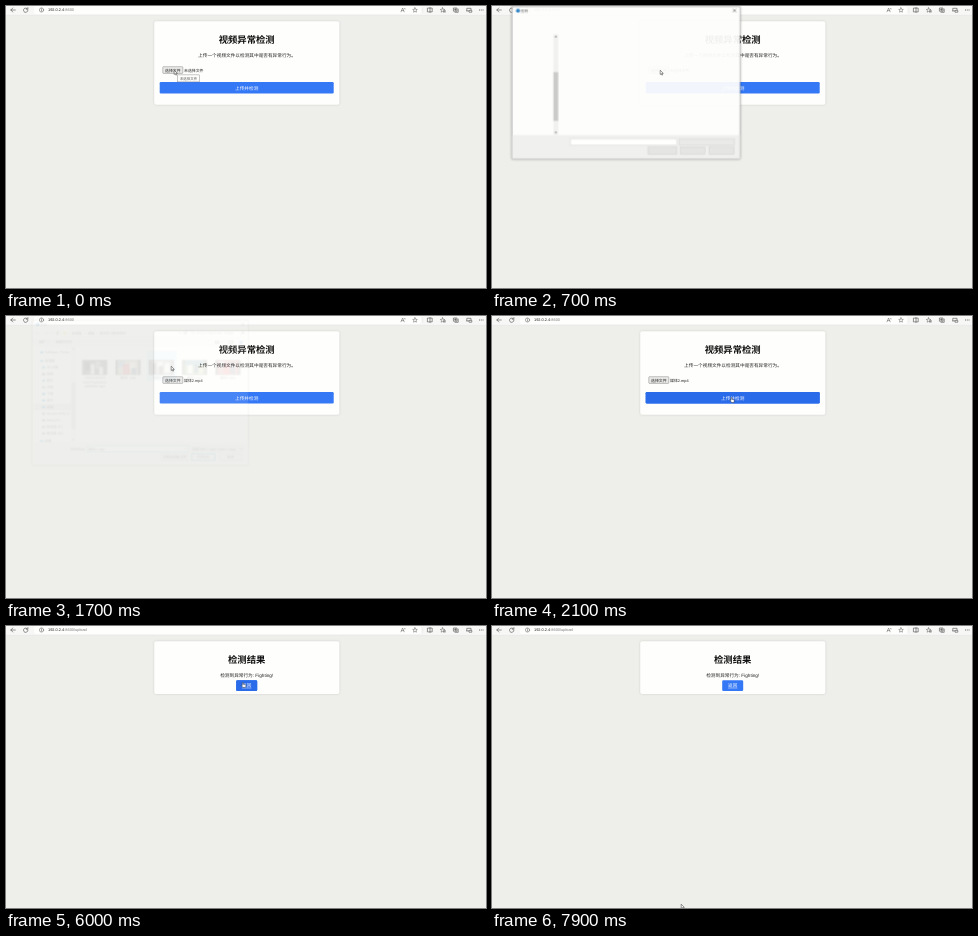
Animation of 480x282 px, one loop 8 s. Source, as an HTML page:

```html
<!DOCTYPE html>
<html lang="zh-CN">
<head>
<meta charset="utf-8">
<title>视频异常检测</title>
<style>
html, body { margin: 0; width: 100%; height: 100%; overflow: hidden; background: #eeefeb; }
svg { display: block; width: 100%; height: 100%; }
text { font-family: "Liberation Sans", "Noto Sans CJK SC", "Noto Sans CJK", sans-serif; text-rendering: geometricPrecision; fill: #222; white-space: pre; }
.mid { text-anchor: middle; }
.h1 { font-size: 9.33px; font-weight: 700; fill: #111; }
.p { font-size: 4.67px; font-weight: 500; }
.s { font-size: 3.9px; }
.d text { font-size: 3.5px; }
.dim, .d .dim { fill: #777; }
.white { fill: #fff; }
.ico { fill: none; stroke: #4a4a4a; stroke-width: .6; stroke-linecap: round; stroke-linejoin: round; }
.card { fill: #fefefc; filter: drop-shadow(0 0 1.2px rgba(0,0,0,.13)); }
.btn { fill: #3478f6; }
.dark { fill: #2a6bea; }

.anim { animation: 8s step-end infinite both; }
.smooth { animation-timing-function: linear; }
.tip { animation-name: tip; }
.upload { animation-name: upload; }
.result { animation-name: result; }
.wait { animation-name: wait; }
.idle { animation-name: idle; }
.empty { animation-name: empty; }
.picked { animation-name: picked; }
.over { animation-name: over; }
.over2 { animation-name: over2; }
.dlg { animation-name: dlg; transform-origin: 134px 76px; }
.labels { animation-name: labels; }
.files { animation-name: files; }
.pick { animation-name: pick; }
.typed { animation-name: typed; }
.cursor { animation-name: cursor; }
.arrow { animation-name: arrow; }
.hand { animation-name: hand; }

@keyframes tip { 0%, 1.25% { opacity: 1 } 5%, 100% { opacity: 0 } }
@keyframes upload { 0% { opacity: 1 } 75%, 100% { opacity: 0 } }
@keyframes result { 0% { opacity: 0 } 75%, 100% { opacity: 1 } }
@keyframes wait { 0% { opacity: 0 } 28.75% { opacity: 1 } 75%, 100% { opacity: 0 } }
@keyframes idle { 0% { opacity: 1 } 28.75% { opacity: 0 } 75%, 100% { opacity: 1 } }
@keyframes empty { 0% { opacity: 1 } 20%, 100% { opacity: 0 } }
@keyframes picked { 0% { opacity: 0 } 20%, 100% { opacity: 1 } }
@keyframes over { 0%, 25% { opacity: 0 } 26.25%, 32.5% { opacity: 1 } 36.25%, 100% { opacity: 0 } }
@keyframes over2 { 0%, 74.9% { opacity: 0 } 75%, 88.75% { opacity: 1 } 91.25%, 100% { opacity: 0 } }
@keyframes dlg {
  0% { opacity: 0; transform: scale(.978, .968) }
  7.5% { opacity: .6; transform: scale(.978, .968) }
  8.75% { opacity: .95; transform: scale(.995) }
  10% { opacity: 1; transform: scale(1) }
  20% { opacity: .55; transform: scale(.97) }
  21.25% { opacity: .1; transform: scale(.943) }
  22.5%, 100% { opacity: 0; transform: scale(.94) }
}
@keyframes labels { 0% { opacity: 0 } 10%, 100% { opacity: 1 } }
@keyframes files { 0% { opacity: 0 } 11.25%, 100% { opacity: 1 } }
@keyframes pick { 0% { opacity: 0 } 16.25% { opacity: .5 } 18.75%, 100% { opacity: 1 } }
@keyframes typed { 0% { opacity: 0 } 18.75%, 100% { opacity: 1 } }
@keyframes cursor {
  0%, 10% { transform: translate(168px, 64px) }
  13.75%, 21.25% { transform: translate(165px, 50px); animation-timing-function: ease-in-out }
  26.25%, 31.25% { transform: translate(238px, 81px); animation-timing-function: ease-in-out }
  36.25%, 87.5% { transform: translate(235.5px, 56px); animation-timing-function: ease-in-out }
  98.75%, 100% { transform: translate(189px, 278px) }
}
@keyframes arrow { 0% { opacity: 1 } 26.25% { opacity: 0 } 33.75% { opacity: 1 } 75% { opacity: 0 } 90%, 100% { opacity: 1 } }
@keyframes hand { 0% { opacity: 0 } 26.25% { opacity: 1 } 33.75% { opacity: 0 } 75% { opacity: 1 } 90%, 100% { opacity: 0 } }
</style>
</head>
<body>
<svg viewBox="0 0 480 282" preserveAspectRatio="none">
  <rect width="480" height="282" fill="#eeefeb"/>

  <!-- browser bar -->
  <rect width="480" height="9" fill="#f7f8f6"/>
  <rect x="28" y=".3" width="387" height="7.6" rx="2" fill="#fefefd"/>
  <path d="M0 9.2H480" stroke="#e4e5e2" stroke-width=".5"/>
  <g class="ico">
    <path d="M9.3 4H4.8M6.8 2L4.8 4L6.8 6"/>
    <path class="anim idle" d="M21.6 3.1A2.2 2.2 0 1 0 21.9 4.4M21.9 1.6V3.2H20.3"/>
    <path class="anim wait" d="M18 2.2L21.6 5.8M21.6 2.2L18 5.8"/>
    <circle cx="35.5" cy="4" r="2.1" stroke-width=".45"/>
    <path d="M35.5 3.8V5.1M35.5 2.8V2.9" stroke-width=".5"/>
    <path d="M395 5.8L396.6 2L398.2 5.8M395.6 4.6H397.6M398.6 2.4Q399.4 1.8 399.2 3" stroke-width=".45"/>
    <path id="star" d="M409 1.8L409.7 3.3L411.3 3.5L410.1 4.6L410.4 6.2L409 5.4L407.6 6.2L407.9 4.6L406.7 3.5L408.3 3.3Z" stroke-width=".45"/>
    <path d="M421.8 2.1H426.2V5.9H421.8ZM424 1.6V6.4"/>
    <use href="#star" x="27.6"/>
    <path d="M437.8 4.8H439.4M438 5.9H439.4"/>
    <path d="M447.8 2H451V5.2H447.8ZM449 6.3H452.2V3.1M449.4 2.8V4.4M448.6 3.6H450.2"/>
    <path d="M460.8 4.9V2.3H465V3.6M460.8 4.9H462.6M463.4 4.4H465.8V6.2H463.4Z"/>
    <path d="M473.4 4H473.5M475.2 4H475.3M477 4H477.1" stroke-width=".9"/>
  </g>
  <path d="M416.8 1.5V6.8" stroke="#ddd" stroke-width=".4"/>
  <text class="s" x="42" y="5.4">192.0.2.4<tspan class="dim">:8600</tspan><tspan class="dim anim result">/upload</tspan></text>

  <!-- upload page -->
  <g class="anim upload">
    <rect class="card anim idle" x="148.2" y="15.2" width="185.2" height="83.6" rx="2"/>
    <rect class="card anim wait" x="148.2" y="15.2" width="185.2" height="90.8" rx="2"/>
    <text class="h1 mid" x="240.7" y="37.4">视频异常检测</text>
    <text class="p mid" x="241" y="50.6">上传一个视频文件以检测其中是否有异常行为。</text>
    <rect x="156.8" y="60.7" width="20" height="6.7" rx=".7" fill="#e9e9e8" stroke="#777" stroke-width=".45"/>
    <text class="s mid" x="166.8" y="65.5">选择文件</text>
    <text class="s anim empty" x="178" y="65.5">未选择文件</text>
    <text class="s anim picked" x="178" y="65.5">媒体2.mp4</text>
    <rect class="btn" x="153.7" y="76" width="174" height="11.6" rx="1.3"/>
    <rect class="dark anim smooth over" x="153.7" y="76" width="174" height="11.6" rx="1.3"/>
    <text class="p mid white" x="240.7" y="83.6">上传并检测</text>
    <text class="p mid anim wait" x="240.7" y="98.9">正在检测，请稍候...</text>
  </g>

  <!-- result page -->
  <g class="anim result">
    <rect class="card" x="148.2" y="15.2" width="185.2" height="52.8" rx="2"/>
    <text class="h1 mid" x="240.7" y="37.4">检测结果</text>
    <text class="p mid" x="240.7" y="50.6">检测到异常行为: Fighting!</text>
    <rect class="btn" x="230.2" y="54.2" width="21" height="10.9" rx="1.3"/>
    <rect class="dark anim smooth over2" x="230.2" y="54.2" width="21" height="10.9" rx="1.3"/>
    <text class="p mid white" x="240.7" y="61.3">返回</text>
    <path d="M236 62.1H245.4" stroke="#fff" stroke-width=".4"/>
  </g>

  <!-- file dialog -->
  <g class="d anim dlg">
    <rect x="19.5" y=".2" width="229" height="152.8" fill="#fdfdfc" stroke="#a5a5a5" stroke-width=".5" style="filter: drop-shadow(0 .8px 1.6px rgba(0,0,0,.35))"/>
    <rect x="19.7" y="129.5" width="228.6" height="23.3" fill="#f0f0ef"/>
    <circle cx="25.4" cy="4.2" r="2" fill="#2a7fc4"/>
    <text x="28.3" y="5.6">打开</text>
    <path class="ico" d="M241.7 2.8L244.3 5.4M244.3 2.8L241.7 5.4" stroke-width=".4"/>
    <rect x="61" y="28" width="4.8" height="101" fill="#f1f1f0"/>
    <rect x="61" y="66" width="4.8" height="49" fill="#c9c9c9"/>
    <path d="M62.3 31L63.4 29.6L64.5 31ZM62.3 126L63.4 127.4L64.5 126Z" fill="#555"/>
    <g fill="#fff" stroke="#c4c4c4" stroke-width=".35">
      <rect x="78" y="133" width="107" height="6.6"/>
      <rect x="187.5" y="133" width="55.5" height="6.6" fill="#e9e9e8"/>
      <rect x="156" y="141" width="29" height="7.8" fill="#e4e4e3"/>
      <rect x="188.7" y="141.2" width="24.6" height="7.4" fill="#e4e4e3"/>
      <rect x="217.5" y="141" width="25.2" height="7.8" fill="#e4e4e3"/>
    </g>

    <g class="anim labels">
      <g fill="none" stroke="#d5d5d5" stroke-width=".35">
        <rect x="50.5" y="10" width="134.5" height="7.2"/>
        <rect x="187.2" y="10" width="58" height="7.2"/>
      </g>
      <rect x="19.8" y="18.8" width="228.4" height="8.6" fill="#f4f5f5"/>
      <path d="M19.8 27.5H248.2" stroke="#e0e0e0" stroke-width=".4"/>
      <g class="ico" stroke-width=".45">
        <path d="M27 13.6H23.8M25 12.4L23.8 13.6L25 14.8M32.4 13.6H35.6M34.4 12.4L35.6 13.6L34.4 14.8" opacity=".3"/>
        <path d="M39.4 13.2L40.2 14L41 13.2" opacity=".5"/>
        <path d="M46.6 15.4V12M45.3 13.3L46.6 12L47.9 13.3"/>
        <path d="M175.2 13.1L176.3 14.2L177.4 13.1M183 13A1.5 1.5 0 1 0 183.1 14M183.1 11.9V13.1H182"/>
        <path d="M241 15L242.1 13.9"/><circle cx="242.9" cy="13" r="1.1"/>
        <path d="M214 21.8H217.4V24.6H214ZM214 23.2H217.4M220.4 22.8L221.2 23.6L222 22.8"/>
        <path d="M228.8 21.5H232.6V24.7H228.8ZM231.2 21.5V24.7"/>
        <path d="M36 22.8L36.8 23.6L37.6 22.8"/>
      </g>
      <rect x="52.4" y="12" width="3.4" height="3.2" rx=".3" fill="#f2cf66"/>
      <circle cx="241.2" cy="23.1" r="1.9" fill="#1b6fc0"/>
      <text class="white mid" x="241.2" y="24.3" style="font-weight:700">?</text>
      <text x="58" y="14.9">›</text><text x="61.6" y="14.9">此电脑</text>
      <text x="75" y="14.9">›</text><text x="78.6" y="14.9">桌面</text>
      <text x="87.8" y="14.9">›</text><text x="91" y="14.9">校内实习相关材料</text>
      <text class="dim" x="189" y="14.9">在 校内实习相关材料 中搜索</text>
      <text x="26.5" y="24.4">组织</text>
      <text x="44.6" y="24.4">新建文件夹</text>
      <g id="side"></g>
      <text x="59.8" y="137.6">文件名(N):</text>
      <rect x="78" y="133" width="107" height="6.6" fill="#fff" stroke="#3b87cf" stroke-width=".5"/>
      <path d="M79.5 134.2V138.4" stroke="#333" stroke-width=".3"/>
      <text class="anim typed" x="79.8" y="137.6">媒体2.mp4</text>
      <text x="189.2" y="137.6">视频文件 (*.ogm;*.wmv;*.mpg</text>
      <path class="ico" d="M181.2 136L182 136.8L182.8 136M239.8 136L240.6 136.8L241.4 136" stroke-width=".4"/>
      <text class="mid" x="170.5" y="146.2">从移动设备上传</text>
      <rect x="188.8" y="141.3" width="24.4" height="7.2" fill="none" stroke="#2f7fd0" stroke-width=".7"/>
      <text class="mid" x="201" y="146.2">打开(O)</text>
      <text class="mid" x="230" y="146.2">取消</text>
    </g>
    <g class="anim files">
      <rect class="anim pick" x="140.5" y="32" width="32.5" height="32.5" fill="#cce6fb"/>
      <g id="files"></g>
    </g>
  </g>

  <!-- tooltip -->
  <g class="anim smooth tip">
    <rect x="171.6" y="68.9" width="21.8" height="7" fill="#fdfdfc" stroke="#777" stroke-width=".4"/>
    <text class="mid" x="182.5" y="73.7" style="font-size:3.45px;fill:#555">未选择文件</text>
  </g>

  <!-- pointer -->
  <g class="anim smooth cursor" fill="#fff" stroke="#222" stroke-width=".45" stroke-linejoin="round">
    <path class="anim arrow" d="M.2 .2V4.5L1.2 3.6L1.9 5.2L2.6 4.9L1.9 3.4H3.3Z"/>
    <path class="anim hand" d="M1 .4Q1.6 0 1.8 .6V2.2L3.9 2.7Q4.4 2.9 4.3 3.5L3.9 5.6H1.7L.1 3.6Q.2 3 1 3.4Z"/>
  </g>
</svg>
<script>
const rect = (x, y, w, h, fill) => `<rect x="${x}" y="${y}" width="${w}" height="${h}" fill="${fill}"/>`;
const label = (x, y, str, cls = '') => `<text x="${x}" y="${y}" class="${cls}">${str}</text>`;

// [name, icon colour, row centre, indent]
const rows = [
  ['PuffNest - Perso', '#2d86d6', 34, 0], ['此电脑', '#4a9bd8', 43, 0],
  ['3D 对象', '#3fa9c9', 50, 2], ['视频', '#6a6f78', 57, 2], ['图片', '#4b93cf', 64, 2],
  ['文档', '#8b97a3', 71, 2], ['下载', '#2f78c8', 78, 2], ['音乐', '#3488d8', 85, 2],
  ['桌面', '#2b84d2', 91.8, 2], ['System-SSD (C', '#8a8f94', 99, 2], ['Data (D:)', '#8a8f94', 106, 2],
  ['新加卷 (F:)', '#8a8f94', 113, 2], ['新加卷 (G:)', '#8a8f94', 120, 2], ['网络', '#4a9bd8', 128, 0]
];
side.innerHTML = rect(20.5, 88.4, 40.5, 6.8, '#dadada') + rows.map(([name, color, y, dx]) =>
  rect(28 + dx, y - 1.2, 3.4, 2.4, color) + label(33 + dx, y + 1.3, name)).join('') +
  rect(20, 129.6, 41, 3, '#f0f0ef');

// thumbnail: backdrop, then blocks as [x, y, w, h, colour]
const clips = [
  ['#55565a', [[3, 2, 5, 9, '#2b2c30'], [9, 4, 4, 11, '#c9c8c6'], [14, 1, 5, 8, '#84868a'], [18, 7, 4, 8, '#d8d6d2']]],
  ['#b8a7a8', [[3, 1, 7, 6, '#6d8fb4'], [8, 4, 7, 11, '#cf4a50'], [15, 2, 6, 8, '#e2c9c6'], [17, 8, 5, 7, '#596a86']]],
  ['#8f9092', [[4, 3, 4, 12, '#34353a'], [9, 1, 6, 6, '#c6c6c4'], [11, 6, 4, 9, '#4a4148'], [17, 3, 5, 10, '#dcdad7']]],
  ['#7fa066', [[3, 0, 20, 5, '#4d7f9c'], [6, 5, 5, 9, '#e4e6e2'], [13, 4, 4, 9, '#35506e'], [18, 8, 4, 6, '#b9cc8f']]],
  ['#b9626a', [[4, 1, 6, 7, '#d9cbc9'], [9, 5, 6, 10, '#d23b48'], [16, 2, 5, 12, '#54506a']]]
];
const names = [['c7be52d8163f', '418375a620e7b', 'd4068fa2.mp4']];
for (let i = 1; i < 5; i++) names.push([`媒体${i}.mp4`]);

files.innerHTML = clips.map(([back, blocks], i) => {
  const x = 72.6 + i * 35.3, y = 42;
  let out = rect(x, y, 26.6, 15.6, '#1b1b1c') + rect(x + 2.6, y + .4, 21.4, 14.8, back);
  for (const [bx, by, w, h, c] of blocks) out += rect(x + bx, y + .4 + by, w, Math.min(h, 14.8 - by), c);
  for (let k = 0; k < 6; k++)
    for (const dx of [.7, 24.7]) out += rect(x + dx, y + .8 + k * 2.5, 1.2, 1.3, '#e8e8e6');
  return out + names[i].map((n, k) => label(x + 13.3, 62.1 + k * 4.5, n, 'mid')).join('');
}).join('');
</script>
</body>
</html>
```
